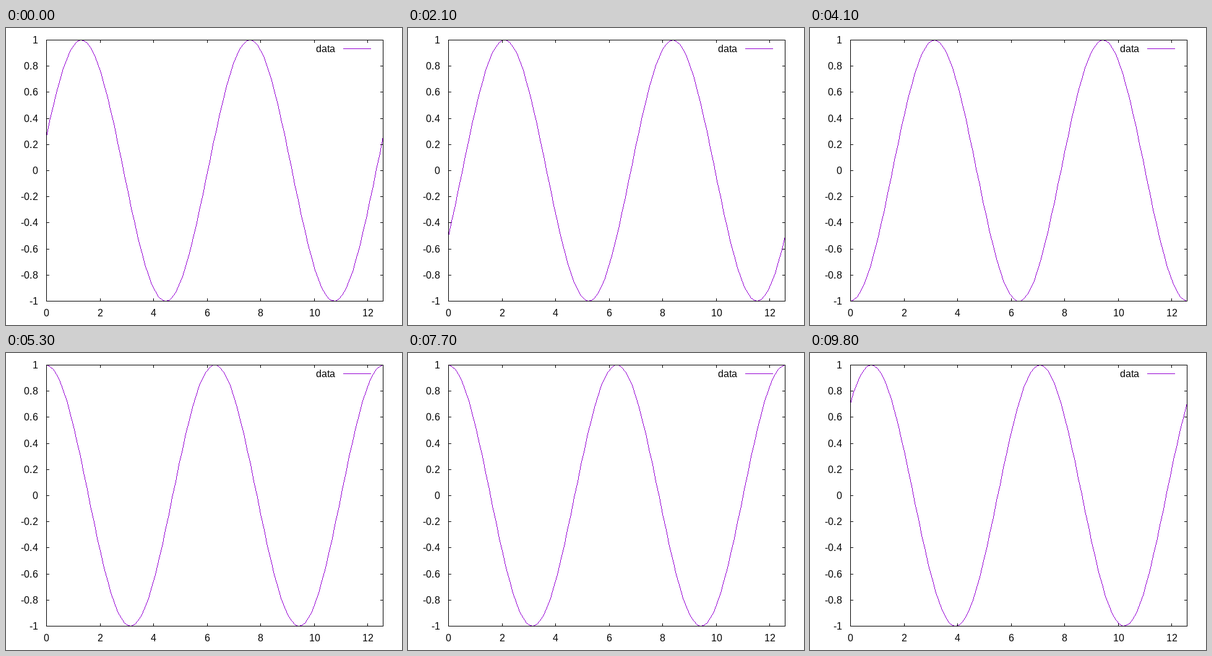
Write a matplotlib script that moves like this. It is 640x480 px and loops after 9.9 s.

```python
import numpy as np
import matplotlib.pyplot as plt
from matplotlib.animation import FuncAnimation

W, H, DPI = 640, 480, 100
LEFT, RIGHT, TOP, BOTTOM = 65, 609, 19, 441
TICK = 4
X_MAX = 4 * np.pi
FRAMES, INTERVAL = 99, 100
PHASE_STEP = np.pi / 12
PURPLE = "#9400d3"
PX = 72 / DPI
FONT_PX = 16
ADVANCE = {"-": 5, ".": 5, "t": 4}

plt.rcParams.update({"font.family": "Liberation Sans",
                     "text.hinting": "native",
                     "path.simplify": False})

fig = plt.figure(figsize=(W / DPI, H / DPI), dpi=DPI, facecolor="white")
ax = fig.add_axes([0, 0, 1, 1])
ax.set_xlim(0, W)
ax.set_ylim(H, 0)
ax.axis("off")


def to_px(x, y):
    """Plot coordinates to whole stage pixels."""
    px = LEFT + x / X_MAX * (RIGHT - LEFT)
    py = BOTTOM - (y + 1) / 2 * (BOTTOM - TOP)
    return np.rint(px).astype(int), np.rint(py).astype(int)


def stroke(xs, ys, color="black", z=3):
    """Straight one-pixel line through pixel centres, ends included."""
    ax.plot(np.asarray(xs) + 0.5, np.asarray(ys) + 0.5, color=color, lw=PX,
            snap=False, zorder=z, solid_capstyle="projecting",
            solid_joinstyle="miter")


def advance(c):
    return ADVANCE.get(c, 9)


def label(s, x, baseline, align):
    """Text set on whole pixels; align 0.5 is centred, 1 is right."""
    ink = sum(map(advance, s)) - 1
    pen = x - int(align * ink)
    for c in s:
        # The offset keeps the glyph's side bearing from rounding up.
        ax.text(pen - 0.45, baseline, c, fontsize=FONT_PX * PX, color="black",
                ha="left", va="baseline", zorder=1)
        pen += advance(c)


def draw_axes():
    stroke([LEFT, RIGHT, RIGHT, LEFT, LEFT], [TOP, TOP, BOTTOM, BOTTOM, TOP])
    for v in range(0, 13, 2):
        x, _ = to_px(v, 0)
        stroke([x, x], [BOTTOM, BOTTOM - TICK])
        stroke([x, x], [TOP, TOP + TICK])
        label(str(v), x, 466, 0.5)
    for i in range(-5, 6):
        _, y = to_px(0, i / 5)
        stroke([LEFT, LEFT + TICK], [y, y])
        stroke([RIGHT, RIGHT - TICK], [y, y])
        label(f"{i / 5:g}", 51, y + 6, 1)


def draw_key():
    label("data", 531, 39, 1)
    stroke([545, 589], [33, 33], PURPLE, 2)


def raster(x0, y0, x1, y1):
    """Pixels of a thin line, one per step along its longer side."""
    if abs(y1 - y0) > abs(x1 - x0) and y0 > y1:
        x0, y0, x1, y1 = x1, y1, x0, y0
    dx, dy = x1 - x0, y1 - y0
    n = max(abs(dx), abs(dy), 1)
    k = np.arange(n + 1)

    def walk(start, d):
        return start + np.sign(d) * ((2 * abs(d) * k + n) // (2 * n))

    return walk(x0, dx), walk(y0, dy)


def dashes(px, py):
    """One pixel-long dash for every pixel of the polyline."""
    parts = [raster(*seg) for seg in zip(px, py, px[1:], py[1:])]
    x, y = (np.concatenate(p) for p in zip(*parts))
    gap = np.full(len(x), np.nan)
    return (np.column_stack([x, x + 1, gap]).ravel(),
            np.column_stack([y + 0.5, y + 0.5, gap]).ravel())


draw_axes()
draw_key()
xs = np.linspace(0, X_MAX, 100)
(curve,) = ax.plot([], [], color=PURPLE, lw=PX, snap=False, zorder=2,
                   solid_capstyle="butt")


def update(n):
    curve.set_data(*dashes(*to_px(xs, np.sin(xs + (n + 1) * PHASE_STEP))))
    return (curve,)


anim = FuncAnimation(fig, update, frames=FRAMES, interval=INTERVAL,
                     repeat=True, repeat_delay=0, blit=False)
plt.show()
```
